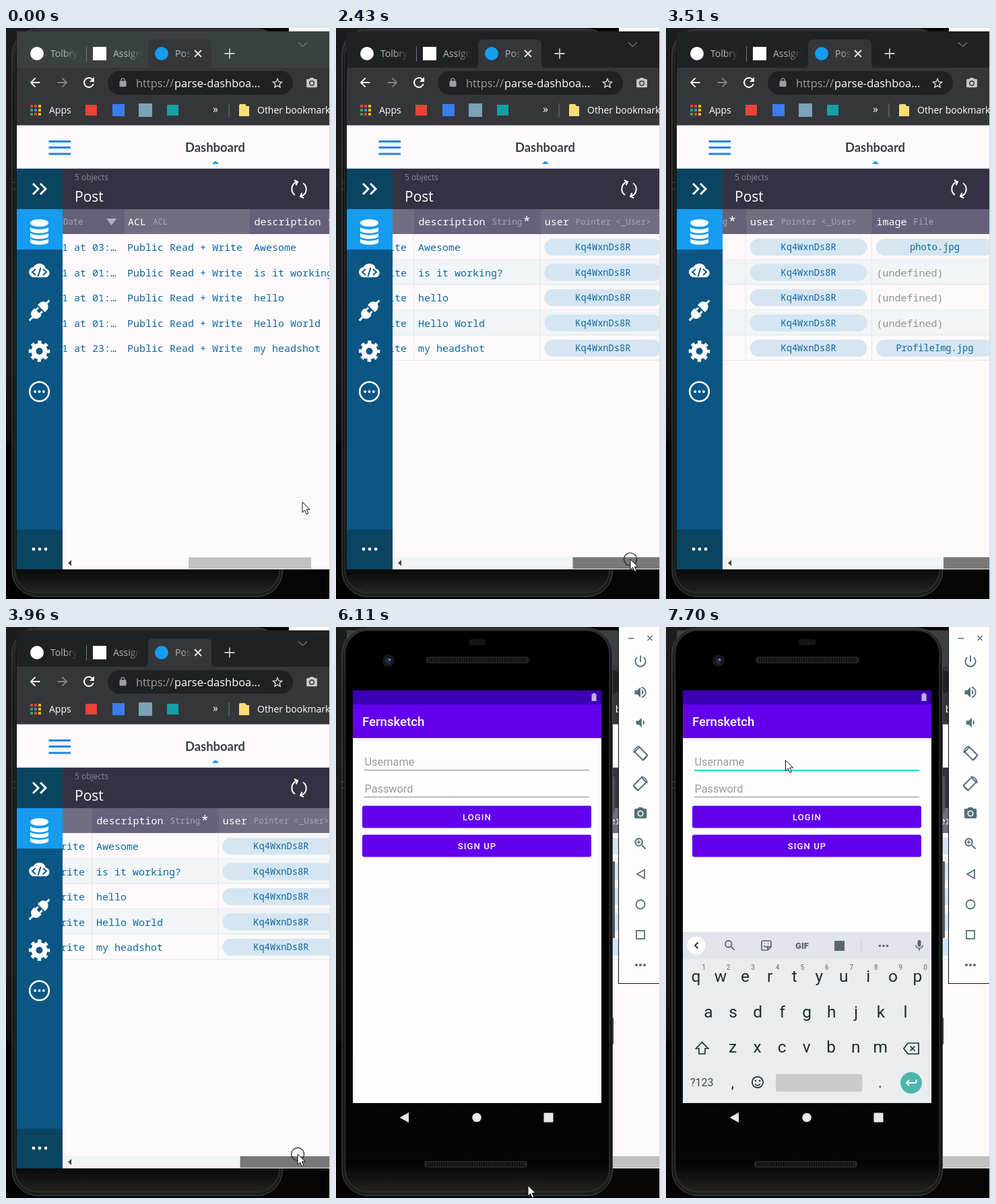
An HTML page for the animation above (8000 ms loop, 481 by 848 pixels).

```html
<!DOCTYPE html>
<html lang="en">
<head>
<meta charset="utf-8">
<title>Dashboard and login</title>
<style>
html, body { margin: 0; width: 100%; height: 100%; overflow: hidden; background: #060606; }
svg { display: block; width: 100%; height: 100%; }
text { font-family: "Open Sans", sans-serif; white-space: pre; }
.mono text { font-family: "Noto Sans Mono", monospace; }
.app text { font-family: Roboto, sans-serif; }
</style>
</head>
<body>
<svg id="stage" viewBox="0 0 481 848" xmlns="http://www.w3.org/2000/svg"></svg>
<script>
const stage = document.getElementById('stage');
const LOOP = 8000, COL = 187.4, ROW = 37.5, TOP = 306;

// ---- drawing helpers ----
const box = (x, y, w, h, fill, r = 0, more = '') =>
  `<rect x="${x}" y="${y}" width="${w}" height="${h}" fill="${fill}" rx="${r}" ${more}/>`;
const dot = (x, y, r, fill, more = '') => `<circle cx="${x}" cy="${y}" r="${r}" fill="${fill}" ${more}/>`;
const shape = (d, fill, more = '') => `<path d="${d}" fill="${fill}" fill-rule="evenodd" ${more}/>`;
const line = (d, color, w = 2, more = '') =>
  `<path d="${d}" fill="none" stroke="${color}" stroke-width="${w}" ${more}/>`;
const text = (x, y, size, fill, str, more = '') =>
  `<text x="${x}" y="${y}" font-size="${size}" fill="${fill}" ${more}>${str.replace(/</g, '&lt;')}</text>`;
const mid = 'text-anchor="middle"';
const icon = (d, x, y, size, fill) =>
  shape(d, fill, `transform="translate(${x - size / 2} ${y - size / 2}) scale(${size / 24})"`);
const dots = (x, y, gap, r, fill) => [-gap, 0, gap].map(d => dot(x + d, y, r, fill)).join('');

const I = {
  back: 'M20 11H7.8l5.6-5.6L12 4l-8 8 8 8 1.4-1.4L7.8 13H20z',
  forward: 'M4 11h12.2l-5.6-5.6L12 4l8 8-8 8-1.4-1.4 5.6-5.6H4z',
  reload: 'M17.65 6.35A8 8 0 1 0 19.73 14h-2.08A6 6 0 1 1 12 6c1.66 0 3.14.69 4.22 1.78L13 11h7V4z',
  lock: 'M18 8h-1V6A5 5 0 0 0 7 6v2H6a2 2 0 0 0-2 2v10a2 2 0 0 0 2 2h12a2 2 0 0 0 2-2V10a2 2 0 0 0-2-2zM9 6a3 3 0 0 1 6 0v2H9z',
  star: 'M22 9.24l-7.19-.62L12 2 9.19 8.63 2 9.24l5.46 4.73L5.82 21 12 17.27 18.18 21l-1.63-7.03zM12 15.4l-3.76 2.27 1-4.28-3.32-2.88 4.38-.38L12 6.1l1.71 4.04 4.38.38-3.32 2.88 1 4.28z',
  camera: 'M9 2L7.2 4H4a2 2 0 0 0-2 2v12a2 2 0 0 0 2 2h16a2 2 0 0 0 2-2V6a2 2 0 0 0-2-2h-3.2L15 2zM12 17a5 5 0 1 1 0-10 5 5 0 0 1 0 10zM12 15.2a3.2 3.2 0 1 0 0-6.4 3.2 3.2 0 0 0 0 6.4z',
  cloud: 'M19.35 10.04A7.49 7.49 0 0 0 12 4C9.11 4 6.6 5.64 5.35 8.04A6 6 0 0 0 0 14a6 6 0 0 0 6 6h13a5 5 0 0 0 .35-9.96z',
  power: 'M13 3h-2v10h2zM17.83 5.17l-1.42 1.42A7 7 0 1 1 7.58 6.58L6.17 5.17A9 9 0 1 0 17.83 5.17z',
  loud: 'M3 9v6h4l5 5V4L7 9zM16.5 12A4.5 4.5 0 0 0 14 7.97v8.05A4.47 4.47 0 0 0 16.5 12zM14 3.23v2.06a7 7 0 0 1 0 13.42v2.06a9 9 0 0 0 0-17.54z',
  quiet: 'M18.5 12A4.5 4.5 0 0 0 16 7.97v8.05A4.47 4.47 0 0 0 18.5 12zM5 9v6h4l5 5V4L9 9z',
  search: 'M15.5 14h-.79l-.28-.27A6.5 6.5 0 1 0 13.73 14.43l.27.28v.79l5 5L20.5 19zM9.5 14a4.5 4.5 0 1 1 0-9 4.5 4.5 0 0 1 0 9z',
  mic: 'M12 14a3 3 0 0 0 3-3V5a3 3 0 0 0-6 0v6a3 3 0 0 0 3 3zM17.3 11a5.3 5.1 0 0 1-10.6 0H5c0 3.4 2.7 6.2 6 6.7V21h2v-3.3c3.3-.5 6-3.3 6-6.7z'
};

// ---- browser window ----
function table() {
  const colX = i => 174 + (i - 1) * COL;
  const posts = ['Awesome', 'is it working?', 'hello', 'Hello World', 'my headshot'];
  const dates = ['03', '01', '01', '01', '23'];
  const files = ['photo.jpg', , , , 'ProfileImg.jpg'];
  const heads = [['', ''], ['ACL', 'ACL'], ['description', 'String'], ['user', 'Pointer <_User>'], ['image', 'File']];
  const blue = '#0e69a1';
  const pill = (i, y, label, id = '') =>
    box(colX(i) + 6.5, y + 7, 174, 25, '#d5e5f2', 12.5, id) +
    text(colX(i) + 93.5, y + 24, 13.7, blue, label, mid);
  let grid = '', cells = '', head = '';
  posts.forEach((post, r) => {
    const y = TOP + r * ROW, base = y + 25;
    if (r % 2) grid += box(-14, y, 940, ROW, '#f2f5f7');
    grid += box(-14, y + ROW - .5, 940, 1, '#e3e5ea');
    cells += text(83, base, 15, blue, `1 at ${dates[r]}:…`) +
      text(colX(1) + 6, base, 15, blue, 'Public Read + Write') +
      text(colX(2) + 6.5, base, 15, blue, post) +
      pill(3, y, 'Kq4WxnDs8R', `id="pill${r}"`) +
      (files[r] ? pill(4, y, files[r]) : text(colX(4) + 7, base, 15, '#8d9299', '(undefined)'));
  });
  heads.forEach(([name, type], i) => {
    const x = colX(i);
    head += box(x, 269, COL, 37, i % 2 ? '#716d83' : '#65617a') + box(x, 269, 1, 37, '#5c5870') +
      text(x + 7, 293, 15, '#fff', name, 'font-weight="500"') +
      text(x + 17 + name.length * 9, 292, 12.4, '#a9a6b4', type);
    if (i) grid += box(x - .5, TOP, 1, ROW * 5, '#e3e5ea');
  });
  head += text(85, 292, 12.4, '#a9a6b4', 'Date') + shape('M149 283h15l-7.5 10z', '#b3b0bd') +
    text(colX(2) + 162, 294, 19, '#fff', '*');
  return `<g clip-path="url(#view)"><g id="table" class="mono"><g id="grid">${grid}</g>${cells}${head}</g></g>`;
}

function sidebar() {
  const w = '#fff', cx = 49.5;
  const disks = [0, 1, 2].map(i => {
    const y = 297 + i * 8.5;
    return shape(`M36 ${y - 1}c4 4 23 4 27 0v5c-2 5-25 5-27 0z`, w);
  }).join('');
  return box(16, 209, 68, 595, '#0c5684') + box(16, 209, 68, 60, '#0a4460') +
    box(16, 269, 68, 60, '#169cee') + box(16, 745, 68, 59, '#0a4460') +
    line('M40 231l8 8-8 8M51 231l8 8-8 8', w, 3) +
    `<ellipse cx="${cx}" cy="289.500" rx="13.500" ry="5.500" fill="#fff"/>` + disks +
    icon(I.cloud, cx, 360, 31, w) +
    line('M44 358l-5 4.500 5 4.500M55 358l5 4.500-5 4.500M51.500 356l-4 13', '#0c5684', 2) +
    `<g transform="translate(49.500 419.500) rotate(-45)">` +
    shape('M-3-7.500h-4a7.500 7.500 0 0 0 0 15h4zM4-7.500h4a7.500 7.500 0 0 1 0 15h-4z', w) +
    line('M-21 0h10M11 0h10M-3-4h5M-3 4h5', w, 3) + '</g>' +
    dot(cx, 480, 8.5, 'none', 'stroke="#fff" stroke-width="7"') +
    dot(cx, 480, 13.2, 'none', 'stroke="#fff" stroke-width="5" stroke-dasharray="5.180" stroke-dashoffset="2.600"') +
    dot(cx, 540, 14.3, 'none', 'stroke="#fff" stroke-width="2.600"') +
    dots(cx, 540, 6.3, 2, w) + dots(50, 774, 9, 2.4, w);
}

function chrome() {
  const grey = '#9aa0a6', white = '#fff', fade = 'url(#fade)';
  const apps = ['#ea4335', '#ea4335', '#fbbc04', '#34a853', '#4285f4', '#fbbc04', '#34a853', '#ea4335', '#fbbc04']
    .map((c, i) => box(36 + i % 3 * 6, 114 + (i / 3 | 0) * 6, 4, 4, c)).join('');
  return box(16, 5, 464, 56, '#202124', 0, 'id="strip"') +
    shape('M203 60q8 0 8-8V25q0-8 8-8h78q8 0 8 8v27q0 8 8 8z', '#35363a') + box(16, 59, 464, 86, '#35363a') +
    dot(46, 38, 10, white) + text(66, 43, 14, fade, 'Tolbry') + box(119, 27, 1, 23, '#74777b') +
    box(129, 28, 20, 20, white) + text(159, 43, 14, fade, 'Assign') +
    dot(231, 38, 10, '#169cee') + text(251, 43, 14, fade, 'Pos') +
    line('M280 33l10 10M290 33l-10 10', '#e8eaed', 1.8) + line('M324.500 38h15M332 30.500v15', '#c4c7ca', 1.8) +
    line('M434 21.500l6.500 6 6.500-6', '#777b7f', 1.2) +
    icon(I.back, 43, 81, 22, white) + icon(I.forward, 84, 81, 22, '#85878a') + icon(I.reload, 123, 81, 24, white) +
    box(151, 64, 275, 35, '#202124', 17.5) + icon(I.lock, 173.5, 81, 15, grey) +
    text(193, 88, 16.4, grey, 'https://<'.slice(0, 8)) + text(250, 88, 16.4, white, 'parse-dashboa...') +
    icon(I.star, 403, 82, 20, '#dcdee0') + icon(I.camera, 454, 82, 19, '#c6c8ca') +
    apps + text(64, 127, 14, white, 'Apps') +
    box(118, 114, 17, 16, '#ea4335') + box(158, 113, 18, 18, '#3b7ded') + box(197, 112, 20, 20, '#7aa3b8') +
    box(239, 114, 17, 16, '#16a0a5') + text(307, 126, 16, white, '»') + box(330.5, 112, 1, 20, '#74777b') +
    shape('M346 115q0-2 2-2h7l2 3h4v15h-15z', '#fbdd74') + text(373, 127, 14, white, 'Other bookmarks');
}

function browser() {
  return box(16, 5, 464, 799, '#fdf9fa') + table() + box(84, 209, 396, 60, '#353144') +
    box(84, 785.5, 396, 18, '#f1f3f5', 0, 'id="track"') + box(0, 786, 182, 17, '#c1c1c1', 0, 'id="thumb"') +
    shape('M97 790v9l-5-4.500z', '#444') + sidebar() + chrome() + box(16, 144.5, 464, 64.5, '#fdfafb') +
    [167, 176, 185.5].map(y => box(63.5, y, 32.5, 3, '#1f82e8')).join('') +
    text(310.5, 184, 18.4, '#3b3b42', 'Dashboard', mid + ' font-weight="700" style="font-family:Lato,sans-serif"') +
    shape('M306 202q3-4 5-4t5 4z', '#169cee') + box(16, 208, 464, 1, '#d5d2d8') +
    text(102, 226, 12, '#8c8998', '5 objects') + text(102, 258, 21, '#fff', 'Post') +
    line('M432 228.500a11 11 0 0 0-3 19.500M438 250a11 11 0 0 0 3-19.500', '#fff', 2) +
    line('M428 226l5 2.500-2.500 5M442 252.500l-5-2.500 2.500-5', '#fff', 2) + box(15, 5, 1, 799, '#1b1b1c');
}

// ---- phone and its tool strip ----
function keyboard() {
  const ink = '#1f2b30', dim = '#5b666c';
  const row = (keys, x, y) => [...keys].map((k, i) => text(x + i * 36.55, y, 24.5, ink, k, mid)).join('');
  return box(25, 453, 369, 254, '#e9edf0') + box(25, 453, 369, 40, '#e1e5e9') +
    dot(45, 473, 13.5, '#fff') + line('M47.500 468.500l-4.500 4.500 4.500 4.500', ink, 1.8) +
    icon(I.search, 95, 473, 21, dim) +
    line('M142 468q0-2 2-2h10q2 0 2 2v7l-5 5h-7q-2 0-2-2zM151 480v-5h5M145 473q3 4 7 1M146 469.500h1M151 469.500h1', dim, 1.7) +
    text(202, 477.5, 13, dim, 'GIF', mid + ' font-weight="900"') + box(250, 466, 15, 15, dim) +
    box(289.500, 464, 1, 19, '#c9ced2') + dots(323, 473.5, 5.5, 1.8, dim) + icon(I.mic, 376, 473, 20, dim) +
    row('qwertyuiop', 44.5, 527) + row('asdfghjkl', 63, 580) + row('zxcvbnm', 99, 632) +
    [...'1234567890'].map((n, i) => text(56 + i * 36.55, 509, 10, dim, n, mid)).join('') +
    line('M53.500 616.500l9 9.500h-4.500v8h-9v-8h-4.500z', ink, 1.7) +
    line('M359 618h16v16h-16l-6-8zM362.500 622.500l7 7M369.500 622.500l-7 7', ink, 1.7) +
    text(36, 682, 16, '#3d484d', '?123') + text(99, 684, 22, ink, ',', mid) + text(318, 684, 22, ink, '.', mid) +
    dot(136, 676, 8.2, 'none', `stroke="${ink}" stroke-width="1.700"`) + dot(133, 674, 1.3, ink) + dot(139, 674, 1.3, ink) +
    line('M132 678.500q4 5 8 0', ink, 1.6) + box(163, 664, 128.5, 26, '#c9cccf', 3) +
    dot(364, 677, 16, '#4db6ac') + line('M371.500 672v5h-14M361 673l-4 4 4 4', '#fff', 1.8);
}

function toolStrip() {
  const c = '#546e7a';
  const turn = (y, s) => `<g transform="translate(452 ${y}) scale(${s} 1)">` +
    box(-5, -8.5, 10, 17, 'none', 1, `stroke="${c}" stroke-width="2" transform="translate(1 1) rotate(-45)"`) +
    line('M-10 0a10 10 0 0 1 9-10M10 2a10 10 0 0 1-8 9', c, 1.7) + '</g>';
  return box(419.5, -1, 61.5, 530.5, '#fdfdfd', 0, 'stroke="#111"') +
    line('M434 17h8M462.500 13l7 7M469.500 13l-7 7', c, 1.5) +
    icon(I.power, 452, 51, 23, c) + icon(I.loud, 452, 97, 23, c) + icon(I.quiet, 452, 142, 22, c) +
    turn(187, 1) + turn(232, -1) + icon(I.camera, 452, 277, 22, c) + icon(I.search, 452, 322, 23, c) +
    line('M446.500 319.500h6M449.500 316.500v6', c, 1.4) + line('M458 360.500v13l-11-6.500z', c, 1.8) +
    dot(452, 412, 6.5, 'none', `stroke="${c}" stroke-width="1.800"`) +
    box(446, 451, 12, 12, 'none', 0, `stroke="${c}" stroke-width="1.800"`) + dots(452, 502, 6, 2.1, c);
}

function phone() {
  const purple = '#6200ee';
  const button = (y, label) => box(39, y, 340, 33, purple, 3) +
    text(209.5, y + 21.7, 13, '#fff', label, mid + ' font-weight="500" letter-spacing="1.100"');
  const speaker = (x, y) => box(x, y, 153, 10, '#242424', 4) +
    line(`M${x + 4} ${y + 5}h145`, '#0c0c0c', 6, 'stroke-dasharray="2 1.500"');
  return box(409, 222, 5, 54, '#55585a', 1) + box(409, 348, 5, 114, '#55585a', 1) + box(409, 580, 3, 40, '#333', 1) +
    box(9, 1.5, 401.5, 843, 'url(#rim)', 38, 'stroke="#4a4b4c"') +
    box(13.5, 5, 392.5, 834, 'url(#body)', 34, 'stroke="#303132" stroke-width="1.500"') +
    line('M8 229.500h6M8 239.500h6', '#454545', 1) +
    box(197, 18, 25, 9, '#141416', 4) + speaker(133.5, 44) + speaker(131, 793) +
    dot(78, 50, 8, '#17181c', 'stroke="#26272b"') + dot(78, 50, 4.5, '#1c2b52') + dot(79.5, 48.5, 1.6, '#7d95c8') +
    `<g class="app" clip-path="url(#screen)">` + box(25, 94, 369, 613, '#fdfdfd') +
    box(25, 94, 369, 21, '#3a00b0') + shape('M381.500 98h3v1.500h2V110h-7V99.500h2z', '#c3b0e6') +
    box(25, 115, 369, 50, purple) + text(39, 147, 18.6, '#fff', 'Fernsketch', 'font-weight="500"') +
    text(42.5, 206, 16.3, '#9b9b9b', 'Username') + text(42.5, 246, 16.3, '#9b9b9b', 'Password') +
    box(42, 212, 334, 1, '#858585', 0, 'id="field"') + box(42, 252, 334, 1, '#858585') +
    button(265.5, 'LOGIN') + button(308.5, 'SIGN UP') + `<g id="keys">${keyboard()}</g></g>` +
    shape('M108 721v15l-13.500-7.500z', '#e8e8e8') + dot(209, 728.5, 6.8, '#e8e8e8') +
    box(308.5, 721.5, 14, 14, '#e8e8e8', 1) + toolStrip();
}

const ramp = (id, stops, more) => `<linearGradient id="${id}" ${more}>` +
  stops.map(([o, c, a = 1]) => `<stop offset="${o}" stop-color="${c}" stop-opacity="${a}"/>`).join('') + '</linearGradient>';
const down = 'x1="0" y1="0" x2="0" y2="1"';

stage.innerHTML = '<defs>' +
  ramp('fade', [[.5, '#b4b8bc'], [1, '#b4b8bc', 0]], '') +
  ramp('wall', [[0, '#1b1c1d'], [.6, '#191816'], [.72, '#0d0c0a'], [.73, '#030303']], down) +
  ramp('rim', [[0, '#2b2c2d'], [.1, '#151616'], [.9, '#151616'], [1, '#1c1d1d']], down) +
  ramp('body', [[0, '#000'], [.95, '#050505'], [1, '#222324']], down) +
  `<clipPath id="view">${box(84, 269, 396, 517, '#000')}</clipPath>` +
  `<clipPath id="screen">${box(25, 94, 369, 613, '#000')}</clipPath></defs>` +
  box(0, 0, 481, 848, '#060606') + box(0, 0, 40, 848, 'url(#wall)') +
  `<g id="phone">${phone()}</g><g id="browser">${browser()}</g>` +
  `<g id="pointer">` + box(480, 0, 1, 848, '#dcdcdc') + '<g id="arrow">' +
  dot(0, 0, 9.5, 'none', 'id="ring" stroke="#222" stroke-width="1.200"') +
  shape('M0 0v15.500l3.600-3.400 2.600 6 2.600-1.100-2.600-5.900h5z', '#fff', 'stroke="#111"') + '</g></g>';

// ---- motion ----
const el = id => document.getElementById(id);
const set = (id, name, value) => el(id).setAttribute(name, value);

// moments at which the screen refreshes
const ticks = [0, 120, 245, 365, 490, 610, 890, 1010, 1130, 1250, 1400, 1520, 1790, 2050, 2170, 2290,
  2430, 2550, 2670, 2790, 2940, 3060, 3200, 3510, 3660, 3810, 3960, 4080, 4220, 4370, 4520, 4640, 4760,
  4910, 5160, 5280, 5400, 5830, 5980, 6110, 6230, 6380, 6500, 6620, 6760, 6890, 7040, 7170, 7310, 7460, 7580, 7700];

// pointer path: time, x, y
const path = [[0, 440, 704], [120, 447, 735], [245, 450, 791], [365, 440, 838], [490, 380, 815],
  [610, 356.5, 797], [890, 356.5, 797], [1400, 395.5, 791], [2430, 437, 789], [3060, 482, 785],
  [3510, 497.5, 785], [3660, 487, 785], [4080, 411.5, 782], [4220, 375, 414], [4370, 396, 320],
  [4520, 420, 300], [4640, 313, 400], [4760, 440, 512], [4910, 460.5, 433], [5160, 455, 520],
  [5400, 430, 860], [5830, 293, 837], [5980, 285, 830], [6230, 285, 829], [6380, 270, 700],
  [6620, 210, 320], [6890, 180, 217], [7040, 177.5, 198], [8000, 177.5, 198]];

function pointerAt(t) {
  const i = path.findIndex(p => p[0] > t), [a, b] = [path[i - 1], path[i]];
  const k = (t - a[0]) / (b[0] - a[0]);
  return [a[1] + (b[1] - a[1]) * k, a[2] + (b[2] - a[2]) * k];
}

let phoneOnTop = null;
function draw(now) {
  const t = ticks.findLast(m => m <= now % LOOP);
  const within = (a, b) => t >= a && t < b;
  const [x, y] = pointerAt(t);
  const used = t >= 890, front = t >= 5980, drag = within(890, 4080);
  const thumb = !used ? 271 : drag ? x - 85.5 : 326;
  const shift = (thumb - 271) * 3.055;

  if (front !== phoneOnTop) {
    stage.insertBefore(el(front ? 'phone' : 'browser'), el('pointer'));
    phoneOnTop = front;
  }
  set('strip', 'fill', used && !front ? '#202124' : '#3b4043');
  set('grid', 'opacity', +used);
  set('track', 'opacity', +used);
  set('table', 'transform', `translate(${-shift} 0)`);
  set('thumb', 'x', thumb);
  set('thumb', 'fill', drag ? '#787878' : !used && y > 786 && y < 803 ? '#a8a8a8' : '#c1c1c1');
  for (let r = 0; r < 5; r++) {
    const over = !drag && !front && Math.abs(y - TOP - 19.5 - r * ROW) < 12.5 && x > 555.3 - shift;
    set('pill' + r, 'fill', over ? '#bdd1e1' : '#d5e5f2');
  }

  const focus = t >= 7170;
  set('field', 'fill', focus ? '#1fd6c8' : '#858585');
  set('field', 'height', focus ? 2 : 1);
  const risen = t < 7460 ? 0 : t < 7580 ? .4 : t < 7700 ? .85 : 1;
  set('keys', 'transform', `translate(0 ${254 * (1 - risen)})`);

  set('arrow', 'transform', `translate(${x} ${y})`);
  set('ring', 'opacity', +(drag || within(5980, 6230) || within(7310, 7460)));
}

const start = performance.now();
(function loop() {
  draw(performance.now() - start);
  requestAnimationFrame(loop);
})();
</script>
</body>
</html>
```
